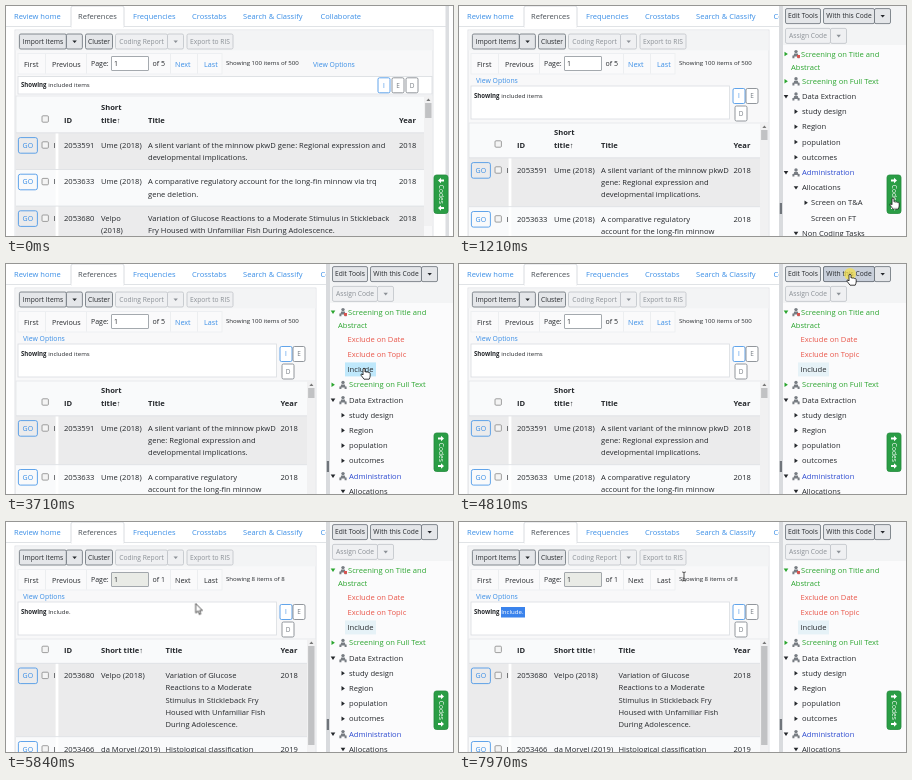
An HTML page that plays this animation: 447x230 px, repeating every 8000 ms.

```html
<!DOCTYPE html>
<html lang="en">
<head>
<meta charset="utf-8">
<title>Reference list</title>
<style>
html, body { margin: 0; width: 447px; height: 230px; overflow: hidden; background: #fff; }
svg { position: absolute; left: 0; top: 0; width: 447px; height: 230px; }
text { font-family: "Open Sans", "Noto Sans", sans-serif; white-space: pre; }
.step { animation: 8s step-end infinite; }
.wide { animation-name: wide; }
.narrow { animation-name: narrow; }
.all { animation-name: all; }
.hits { animation-name: hits; }
.shut { animation-name: shut; }
.open { animation-name: open; }
.hover { animation-name: hover; }
.pick { animation-name: pick; }
.arrow { animation-name: arrow; }
.hand { animation-name: hand; }
.beam { animation-name: beam; }
.press { animation-name: press; }
#sel { animation: sel 8s linear infinite; }
#cursor { animation: move 8s linear infinite; }

@keyframes wide { 0% { opacity: 1 } 14%, 100% { opacity: 0 } }
@keyframes narrow { 0% { opacity: 0 } 14%, 100% { opacity: 1 } }
@keyframes all { 0% { opacity: 0 } 14% { opacity: 1 } 62.5%, 100% { opacity: 0 } }
@keyframes hits { 0% { opacity: 0 } 62.5%, 100% { opacity: 1 } }
@keyframes shut { 0% { opacity: 1 } 32.375%, 100% { opacity: 0 } }
@keyframes open { 0% { opacity: 0 } 32.375%, 100% { opacity: 1 } }
@keyframes hover { 0% { opacity: 0 } 55% { opacity: 1 } 70.5%, 100% { opacity: 0 } }
@keyframes pick {
  0% { fill: transparent } 41.625% { fill: #f0f8fd } 46.375% { fill: #bfe8fb }
  50.5%, 100% { fill: #e6f2f7 }
}
@keyframes arrow {
  0% { opacity: 0 } 4.625% { opacity: 1 } 7% { opacity: 0 } 17.25% { opacity: 1 }
  25.5% { opacity: 0 } 50.5% { opacity: 1 } 54.5% { opacity: 0 }
  70.5% { opacity: 1 } 76.25%, 100% { opacity: 0 }
}
@keyframes hand {
  0% { opacity: 0 } 7% { opacity: 1 } 17.25% { opacity: 0 } 25.5% { opacity: 1 }
  50.5% { opacity: 0 } 54.5% { opacity: 1 } 70.5%, 100% { opacity: 0 }
}
@keyframes beam { 0% { opacity: 0 } 76.25%, 100% { opacity: 1 } }
@keyframes press {
  0% { opacity: 0 } 11.625% { opacity: .75 } 12.875% { opacity: 0 }
  30.125% { opacity: .75 } 31.375% { opacity: 0 } 43.875% { opacity: .75 } 46.375% { opacity: 0 }
  60.125% { opacity: .75 } 61.25% { opacity: 0 } 78.75% { opacity: .75 } 89.25%, 100% { opacity: 0 }
}
@keyframes sel {
  0%, 79.4% { clip-path: inset(0 381px 0 66px) }
  81% { clip-path: inset(0 381px 0 26px) }
  82%, 86.74% { clip-path: inset(0 381px 0 15px) }
  86.75%, 100% { clip-path: inset(0 381px 0 42px) }
}
@keyframes move {
  0%, 4.625% { transform: translate(421px, 208px) }
  8.125%, 15.125% { transform: translate(434px, 192px) }
  20.875% { transform: translate(411px, 83px) }
  25% { transform: translate(319px, 51px) }
  26.625%, 36% { transform: translate(328px, 48px) }
  41.625%, 49% { transform: translate(358px, 104px) }
  53.75% { transform: translate(414px, 19px) }
  55.625%, 69% { transform: translate(391px, 10px) }
  74.5% { transform: translate(115px, 108px) }
  76.5%, 78.75% { transform: translate(88px, 93px) }
  81% { transform: translate(21px, 91px) }
  83.25%, 86.74% { transform: translate(7px, 94px) }
  86.75%, 92% { transform: translate(14px, 92px) }
  95% { transform: translate(217px, 55px) }
  96.125%, 97.5% { transform: translate(195px, 61px) }
  99.625%, 100% { transform: translate(225px, 54px) }
}
</style>
</head>
<body>
<svg id="stage" viewBox="0 0 447 230"></svg>
<svg id="sel" viewBox="0 0 447 230"></svg>
<svg id="top" viewBox="0 0 447 230">
  <g id="cursor">
    <circle class="step press" r="6" fill="#f3df4c"/>
    <path class="step arrow" d="M0 0V9.5L2.2 7.5L3.7 11L5.2 10.3L3.8 7H6.8Z" fill="#fff" stroke="#111" stroke-width=".7"/>
    <path class="step hand" d="M-1 .8Q0-.6 1 .8V4Q2 3.2 2.8 4.2Q3.9 3.6 4.6 4.6Q6 4.2 6.2 5.6V8Q6 9.6 5.2 11.2H0L-3 7.2Q-3.4 5.8-2 6L-1 7Z" fill="#fff" stroke="#111" stroke-width=".8"/>
    <path class="step beam" d="M-1.8-4Q0-4 0-3Q0-4 1.8-4M0-3V4M-1.8 5Q0 5 0 4Q0 5 1.8 5" fill="none" stroke="#222" stroke-width=".8"/>
  </g>
</svg>
<script>
const BLUE = '#3a8ee6', INK = '#25282c', DIM = '#8b9096', LINE = '#d9dce0';
const PITCH = 12.3, PAD = 6;
const stage = document.getElementById('stage');

function add(parent, tag, attrs) {
  const node = document.createElementNS('http://www.w3.org/2000/svg', tag);
  for (const key in attrs) node.setAttribute(key, attrs[key]);
  return parent.appendChild(node);
}
const group = (name, parent = stage) => add(parent, 'g', { class: 'step ' + name });
const path = (g, d, fill) => add(g, 'path', { d, fill });

function rect(g, x, y, w, h, fill, stroke = 'none', rx = 0) {
  return add(g, 'rect', { x, y, width: w, height: h, fill, stroke, rx, 'stroke-width': .8 });
}
// y is the middle of the lower-case letters
function text(g, x, y, str, size = 7.6, fill = INK, weight = 400, anchor = 'start') {
  const t = add(g, 'text', { x, y: y + size * .35, 'font-size': size, fill, 'font-weight': weight, 'text-anchor': anchor });
  t.textContent = str;
  return t;
}
function button(g, x, y, w, label, dim, split, fill = '#e4e6e9') {
  const edge = dim ? '#bfc3c8' : '#686f77', face = dim ? '#eff0f2' : fill;
  rect(g, x, y, w, 15, face, edge, 1.5);
  text(g, x + w / 2, y + 7.5, label, 6.7, dim ? DIM : INK, 400, 'middle');
  if (!split) return;
  rect(g, x + w, y, 16, 15, face, edge, 1.5);
  path(g, `M${x + w + 6} ${y + 6.4}h4.4l-2.2 2.6z`, dim ? DIM : INK);
}
function keyBox(g, x, y, label, color) {
  rect(g, x, y, 12, 15, '#fff', color, 1.5);
  text(g, x + 6, y + 7.5, label, 6.5, color, 400, 'middle');
}
const check = (g, y) => rect(g, 36, y - 3.2, 6.4, 6.4, '#f4f4f4', '#888', 1);

function showing(g, y, what, fill) {
  const t = text(g, 15, y, '', 6.1, fill);
  add(t, 'tspan', { 'font-weight': 700 }).textContent = 'Showing ';
  add(t, 'tspan', {}).textContent = what;
}

function row(g, y, item, lines, { yearX, right, titleX }, shaded) {
  const h = lines.length * PITCH + 2 * PAD, top = y - PITCH / 2 - PAD;
  const fill = shaded ? '#ebebec' : '#f9fafb';
  rect(g, 10, top, right - 10, h, fill);
  rect(g, 10, top - .4, right - 10, .8, '#dcdfe3');
  rect(g, 49.6, top + .6, 2.8, h - 1, '#fff');
  rect(g, 12.4, y - 7.4, 19, 15.6, fill, BLUE, 2);
  text(g, 21.9, y + .4, 'GO', 7, BLUE, 400, 'middle');
  check(g, y);
  text(g, 47.2, y, 'I');
  text(g, 58, y, item.id);
  item.author.forEach((s, i) => text(g, 95, y + i * PITCH, s));
  lines.forEach((s, i) => text(g, titleX, y + i * PITCH, s));
  text(g, yearX, y, item.year);
  return y + h;
}

function page(opts) {
  const { name, wide, hits, head, yearX, right, titleX, thumb, rows } = opts;
  const g = group(name), edge = right + 9;
  rect(g, 0, 22, 442, 208, '#fff');
  rect(g, 9, 24, edge - 9, 210, '#f8f8f9', LINE);
  rect(g, 9.4, 24.4, edge - 9.8, 20, '#f3f4f5');
  button(g, 13.4, 28, 47, 'Import Items', false, true);
  button(g, 79.5, 28, 27, 'Cluster');
  button(g, 109.5, 28, 52, 'Coding Report', true, true);
  button(g, 181, 28, 46, 'Export to RIS', true);

  rect(g, 12, 47.5, 204, 20.5, '#fafafb', '#eceef0');
  for (const x of [39, 80, 164, 191]) rect(g, x, 48, .7, 19.5, '#e6e8eb');
  const link = hits ? INK : BLUE;
  text(g, 18, 58, 'First', 7.2);
  text(g, 46, 58, 'Previous', 7.2);
  text(g, 85, 58, 'Page:', 7);
  rect(g, 105.5, 50.5, 37, 14, hits ? '#e9ebe6' : '#fff', '#8f959b', .5);
  text(g, 108, 57.6, '1', 7);
  text(g, 146.5, 58, hits ? 'of 1' : 'of 5', 7);
  text(g, 169, 58, 'Next', 7.2, link);
  text(g, 198, 58, 'Last', 7.2, link);
  text(g, 220, 57.3, hits ? 'Showing 8 items of 8' : 'Showing 100 items of 500', 6.1);
  text(g, wide ? 307 : 17, wide ? 59 : 75, 'View Options', 6.85, BLUE);

  if (wide) {
    rect(g, 12, 70.5, 414, 17.5, '#fff', LINE);
    ['I', 'E', 'D'].forEach((s, i) => keyBox(g, 372 + i * 14, 71.8, s, i ? '#777d84' : BLUE));
  } else {
    rect(g, 12, 80, 258.5, 33, '#fff', LINE);
    keyBox(g, 274, 82.5, 'I', BLUE);
    keyBox(g, 287, 82.5, 'E', '#777d84');
    keyBox(g, 276, 100, 'D', '#777d84');
  }
  showing(g, wide ? 79.3 : 90, hits ? 'Include.' : 'included items', INK);

  const top = wide ? 90 : 117;
  rect(g, 10, top, edge - 10.4, 120, '#f9fafb', '#e3e5e8');
  check(g, head - 1);
  text(g, 58, head, 'ID', 7.6, INK, 700);
  if (hits) text(g, 95, head, 'Short title↑', 7.6, INK, 700);
  else {
    text(g, 95, head - PITCH, 'Short', 7.6, INK, 700);
    text(g, 95, head, 'title↑', 7.6, INK, 700);
  }
  text(g, titleX, head, 'Title', 7.6, INK, 700);
  text(g, yearX, head, 'Year', 7.6, INK, 700);

  let y = head + 25;
  rows.forEach(([item, lines], i) => { y = row(g, y, item, lines, opts, i % 2 === 0); });

  rect(g, right, top, 8.6, 130, '#f1f1f2');
  path(g, `M${right + 2.4} ${top + 5}h4l-2-2.4z`, '#777');
  rect(g, right + 1.1, top + 7, 6.4, thumb, '#c1c2c4');
}

const entry = (id, author, year) => ({ id, author, year });
const ume1 = entry('2053591', ['Ume (2018)'], '2018');
const ume2 = entry('2053633', ['Ume (2018)'], '2018');
const velpo = entry('2053680', ['Velpo (2018)'], '2018');
const velpoTall = entry('2053680', ['Velpo', '(2018)'], '2018');
const morvel = entry('2053466', ['da Morvel (2019)'], '2019');

// tabs
rect(stage, 0, 0, 447, 230, '#fff');
rect(stage, 0, 20.2, 442, .8, LINE);
path(stage, 'M65 21V2Q65 0 67 0H116Q118 0 118 2V21Z', '#fff').setAttribute('stroke', LINE);
rect(stage, 65.5, 19.5, 52, 2.5, '#fff');
[[8, 'Review home'], [72, 'References'], [127, 'Frequencies'], [186, 'Crosstabs'],
 [237, 'Search & Classify'], [314.5, 'Collaborate']]
  .forEach(([x, s]) => text(stage, x, 10.5, s, 7.55, x === 72 ? '#495057' : BLUE));

page({
  name: 'wide', wide: true, head: 114, yearX: 393, right: 418, titleX: 142, thumb: 15,
  rows: [
    [ume1, ['A silent variant of the minnow pkwD gene: Regional expression and', 'developmental implications.']],
    [ume2, ['A comparative regulatory account for the long-fin minnow via trq', 'gene deletion.']],
    [velpoTall, ['Variation of Glucose Reactions to a Moderate Stimulus in Stickleback', 'Fry Housed with Unfamiliar Fish During Adolescence.']]
  ]
});
page({
  name: 'all', head: 139, yearX: 274.5, right: 301, titleX: 142, thumb: 10,
  rows: [
    [ume1, ['A silent variant of the minnow pkwD', 'gene: Regional expression and', 'developmental implications.']],
    [ume2, ['A comparative regulatory', 'account for the long-fin minnow', 'via trq gene deletion.']]
  ]
});
page({
  name: 'hits', hits: true, head: 128.4, yearX: 274.5, right: 301, titleX: 159.5, thumb: 99,
  rows: [
    [velpo, ['Variation of Glucose', 'Reactions to a Moderate', 'Stimulus in Stickleback Fry', 'Housed with Unfamiliar Fish', 'During Adolescence.']],
    [morvel, ['Histological classification']]
  ]
});

// code panel
const GREEN = '#2ba52f', RED = '#e9564a', NAVY = '#2b49cf';
rect(group('wide'), 439.5, 0, 3.5, 230, '#dcdee1');
const panel = group('narrow');
rect(panel, 320, 0, 127, 230, '#fbfbfc');
rect(panel, 320, 0, 4, 230, '#d9dbde');
rect(panel, 320.8, 197, 2.2, 11, '#70757b');
rect(panel, 324, 0, 123, 39, '#f3f4f5');
button(panel, 326.5, 2.6, 35, 'Edit Tools');
button(panel, 364.5, 2.6, 51, 'With this Code', false, true);
button(group('hover', panel), 364.5, 2.6, 51, 'With this Code', false, false, '#c8cfda');
button(panel, 326.5, 22.4, 45, 'Assign Code', true, true);

function marker(g, x, y, down, fill) {
  path(g, down ? `M${x - 2.3} ${y - 1.4}h4.6l-2.3 3.4z` : `M${x - 1.5} ${y - 2.3}v4.6l3.4-2.3z`, fill);
}
function icon(g, y, dot) {
  add(g, 'circle', { cx: 337, cy: y - 2.4, r: 1.7, fill: '#777c82' });
  path(g, `M335.2 ${y - .4}h3.6l.6 2h-4.8zM333.4 ${y + 1.6}h7.2v1h-7.2zM333.4 ${y + 2.6}h2v1.6h-2zM338.6 ${y + 2.6}h2v1.6h-2z`, '#777c82');
  if (dot) rect(g, 338, y + 1, 3, 2.8, '#d9534f');
}
function tree(name, open) {
  const g = group(name, panel);
  const leaves = [['Exclude on Date', RED], ['Exclude on Topic', RED], ['Include', INK]];
  // depth, label, colour, arrow state
  const nodes = [
    [0, 'Screening on Full Text', GREEN, 'side'], [0, 'Data Extraction', INK, 'down'],
    [1, 'study design', INK, 'side'], [1, 'Region', INK, 'side'], [1, 'population', INK, 'side'],
    [1, 'outcomes', INK, 'side'], [0, 'Administration', NAVY, 'down'], [1, 'Allocations', INK, 'down'],
    [2, 'Screen on T&A', INK, 'side'], [2, 'Screen on FT', INK], [1, 'Non Coding Tasks', INK, 'down']
  ];
  marker(g, 327, 48, open, GREEN);
  icon(g, 48, true);
  text(g, 342, 48, 'Screening on Title and', 7.6, GREEN);
  text(g, 332, 61, 'Abstract', 7.6, GREEN);
  let y = 75.2;
  if (open) {
    rect(g, 339, 98.4, 31, 14, 'transparent').classList.add('step', 'pick');
    for (const [label, color] of leaves) {
      text(g, 341.5, y, label, 7.6, color);
      y += 15.2;
    }
  }
  for (const [depth, label, color, state] of nodes) {
    if (state) marker(g, 327 + depth * 10, y, state === 'down', color === NAVY ? INK : color);
    if (!depth) icon(g, y);
    text(g, depth === 2 ? 352 : 343, y, label, 7.6, color);
    y += 15.2;
  }
}
tree('shut', false);
tree('open', true);

// side button
rect(stage, 428, 169, 14, 38.5, '#2a9d45', '#238a3b', 2.5);
const label = text(stage, 0, 0, 'Codes', 6.6, '#fff', 400, 'middle');
label.setAttribute('transform', 'translate(435 188.3) rotate(90)');
for (const y of [174.5, 202]) {
  path(group('wide'), `M432 ${y}l3-2.8v1.9h3v1.8h-3v1.9z`, '#fff');
  path(group('narrow'), `M438 ${y}l-3-2.8v1.9h-3v1.8h3v1.9z`, '#fff');
}

// selected text
const sel = document.getElementById('sel');
rect(sel, 15, 85, 51, 10.5, '#3a83ec');
showing(sel, 90, 'Include.', '#fff');
</script>
</body>
</html>
```
